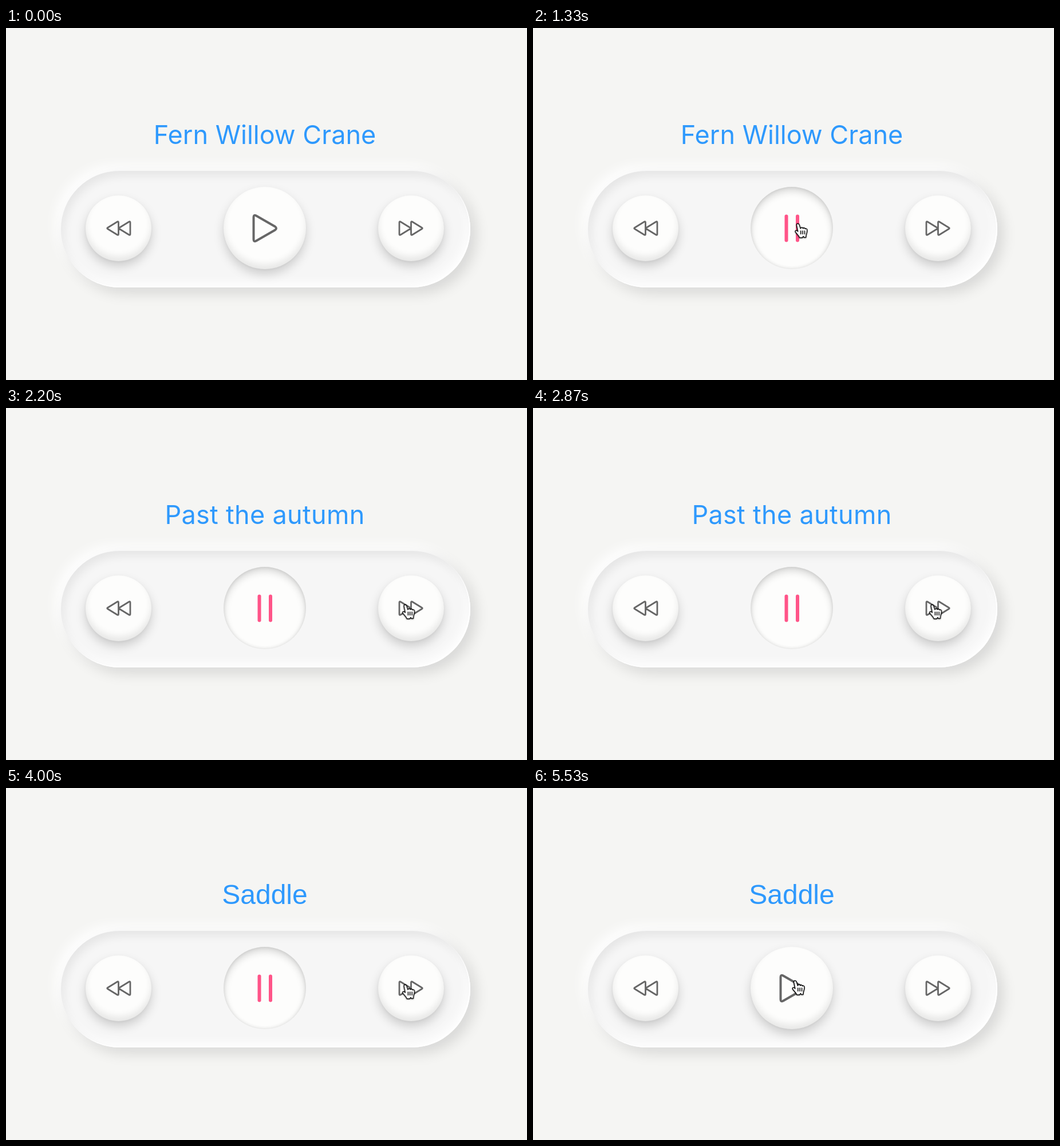
Animation of 910 by 616 pixels, one loop 5590 ms. Source, as an HTML page:

```html
<!DOCTYPE html>
<html lang="en">
<head>
<meta charset="utf-8">
<title>Music player buttons</title>
<style>
  html, body { margin: 0; width: 100%; height: 100%; overflow: hidden; background: #f5f5f3; }
  .stage { position: relative; width: 910px; height: 616px; overflow: hidden; background: #f5f5f3; }
  .stage > * { position: absolute; box-sizing: border-box; }
  svg { left: 0; top: 0; }

  .panel {
    left: 96px; top: 249.5px; width: 715px; height: 204.5px;
    border-radius: 103px; background: #f6f6f6;
    box-shadow: 10px 10px 24px rgba(0, 0, 0, .12), -9px -9px 22px #fff,
      inset -2px -2px 1px #fff, inset 5px 9px 16px rgba(0, 0, 0, .065),
      inset -6px -9px 18px rgba(255, 255, 255, .85);
  }
  .button {
    left: 139px; top: 292.5px; width: 115px; height: 115px;
    border-radius: 50%; background: #fdfdfc;
    box-shadow: 0 9px 18px rgba(0, 0, 0, .17), 0 2px 5px rgba(0, 0, 0, .04),
      inset 0 -8px 12px rgba(0, 0, 0, .085);
  }
  .next { left: 650px; }
  .main { left: 380px; top: 278px; width: 144px; height: 144px; }
  .pressed {
    box-shadow: inset 0 7px 13px rgba(0, 0, 0, .15), inset 0 0 6px rgba(0, 0, 0, .12);
  }

  .title { fill: #2e99fd; font: 45px Inter, sans-serif; text-anchor: middle; }
  .plain { font: 48px "Liberation Sans", Arial, sans-serif; }
  .icon { fill: none; stroke: #666; stroke-width: 2.8; stroke-linejoin: round; }
  .play { stroke-width: 4; }

  .idle, .pressed, .bars, .song, .hand, .arrow { animation: 5590ms step-end infinite; }
  .idle { animation-name: idle; }
  .pressed, .bars { animation-name: playing; }
  .first { animation-name: first; }
  .second { animation-name: second; letter-spacing: .3px; }
  .third { animation-name: third; }
  .hand { animation-name: hand; }
  .arrow { animation-name: arrow; }
  .cursor { animation: travel 5590ms linear infinite; filter: drop-shadow(0 1px 1px rgba(0, 0, 0, .3)); }

  @keyframes idle { 0% { opacity: 1 } 16.1% { opacity: 0 } 93%, 100% { opacity: 1 } }
  @keyframes playing { 0% { opacity: 0 } 16.1% { opacity: 1 } 93%, 100% { opacity: 0 } }

  @keyframes first { 0% { opacity: 1 } 35%, 100% { opacity: 0 } }
  @keyframes second { 0% { opacity: 0 } 35% { opacity: 1 } 69.8%, 100% { opacity: 0 } }
  @keyframes third { 0% { opacity: 0 } 69.8%, 100% { opacity: 1 } }

  @keyframes hand {
    0% { opacity: 0 } 5.1% { opacity: 1 } 25% { opacity: 0 } 27.7% { opacity: 1 }
    81.9% { opacity: 0 } 86.4%, 100% { opacity: 1 }
  }
  @keyframes arrow {
    0% { opacity: 1 } 5.1% { opacity: 0 } 25% { opacity: 1 } 27.7% { opacity: 0 }
    81.9% { opacity: 1 } 86.4%, 100% { opacity: 0 }
  }
  @keyframes travel {
    0%, 1.25% { transform: translate(476px, 640px); animation-timing-function: cubic-bezier(.3, 0, .3, 1) }
    9%, 21.5% { transform: translate(452px, 343px); animation-timing-function: ease-in }
    23.79% { transform: translate(461.5px, 343px); animation-timing-function: cubic-bezier(.2, .4, .4, 1) }
    31.5%, 77.5% { transform: translate(697.5px, 345px); animation-timing-function: ease-in }
    85.87% { transform: translate(518px, 333px); animation-timing-function: ease-out }
    90%, 100% { transform: translate(458px, 338px) }
  }
</style>
</head>
<body>
<div class="stage">
  <div class="panel"></div>
  <div class="button prev"></div>
  <div class="button next"></div>
  <div class="button main idle"></div>
  <div class="button main pressed"></div>

  <svg width="910" height="616" viewBox="0 0 910 616">
    <defs>
      <path id="skip" d="M177.5 349.5L194.5 339Q196.5 338 196.5 340.5V360.5Q196.5 363 194.5 362L177.5 351.5Q176 350.5 177.5 349.5ZM198 349.5L215 339Q217 338 217 340.5V360.5Q217 363 215 362L198 351.5Q196.5 350.5 198 349.5Z"/>
    </defs>

    <g class="title">
      <text class="song first" x="452" y="203">Fern Willow Crane</text>
      <text class="song second" x="452" y="203">Past the autumn</text>
      <text class="song third plain" x="452" y="203">Saddle</text>
    </g>

    <g class="icon">
      <use href="#skip"/>
      <use href="#skip" transform="matrix(-1 0 0 1 904 0)"/>
      <path class="idle play" d="M432.5 331Q432.5 326 437 328.5L470 347.5Q474 350.5 470 353.5L437 372.5Q432.5 375 432.5 370Z"/>
    </g>
    <g class="bars" fill="#ff5488">
      <rect x="439.5" y="326.5" width="6" height="48" rx="3"/>
      <rect x="459" y="326.5" width="6" height="48" rx="3"/>
    </g>

    <g class="cursor">
      <path class="arrow" d="M0 0V18.5L4.3 14.4L7 21L10.2 19.6L7.4 13.2H13Z" stroke="#fff" stroke-width="2" paint-order="stroke"/>
      <g class="hand" stroke="#000" stroke-width="1.5" stroke-linejoin="round" stroke-linecap="round">
        <path fill="#fff" d="M-2.5 2C-3 -1.5 1.5 -1.8 2.3 1.2L4.5 8C5 5.5 8 5.5 8.8 7.8C9.5 6 12 6.3 12.6 8.6C13.6 7.4 16 8 16 10.5C16.3 14 15.5 16 14.5 18.5L13.8 23.5H10.5L9.5 21.5L7.5 24H2.8C1.5 20.5 -1.5 18 -4.2 14.5C-6 11.5 -3 10 -.2 13Z"/>
        <path fill="none" d="M4.8 12V17.5M8.2 12V17.5M11.6 12V17.5"/>
      </g>
    </g>
  </svg>
</div>
</body>
</html>
```
